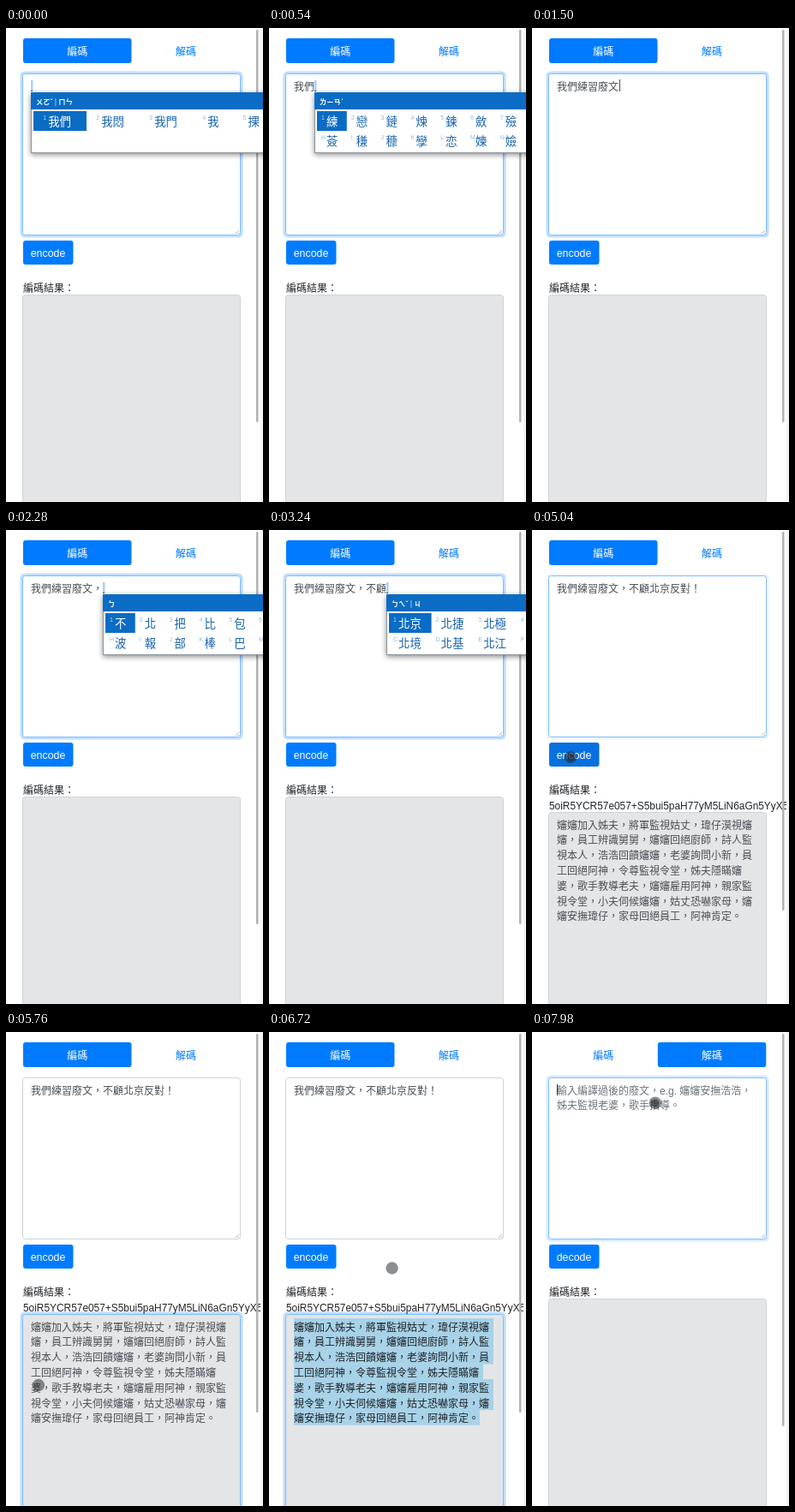
Animation, 300 px wide and 553 px high, one loop 8 s. Source, as an HTML page:

```html
<!DOCTYPE html>
<html lang="zh-Hant">
<head>
<meta charset="utf-8">
<style>
html, body { margin: 0; width: 100%; height: 100%; overflow: hidden; background: #fff; }
svg { display: block; width: 300px; height: 553px; font: 12px "Liberation Sans", "Noto Sans CJK TC", "Noto Sans CJK", sans-serif; }
text { white-space: pre; }
.popup { filter: drop-shadow(0 2px 3px rgba(0, 0, 0, .45)); }
</style>
</head>
<body>
<svg id="stage" viewBox="0 0 300 553"></svg>
<script>
const LOOP = 8000, STEP = 60;
const BLUE = '#007bff', PRESSED_BLUE = '#0870e0', INK = '#495057', DARK = '#212529';
const MESSAGE = '我們練習廢文，不顧北京反對！';
const BASE64 = '5oiR5YCR57e057+S5bui5paH77yM5LiN6aGn5YyX5Lqs';
const RESULT = [
  '嬸嬸加入姊夫，將軍監視姑丈，瑋仔漠視嬸', '嬸，員工辨識舅舅，嬸嬸回絕廚師，詩人監',
  '視本人，浩浩回饋嬸嬸，老婆詢問小新，員', '工回絕阿神，令尊監視令堂，姊夫隱瞞嬸',
  '婆，歌手教導老夫，嬸嬸雇用阿神，親家監', '視令堂，小夫伺候嬸嬸，姑丈恐嚇家母，嬸',
  '嬸安撫瑋仔，家母回絕員工，阿神肯定。'
];
const HINT = ['輸入編譯過後的廢文，e.g. 嬸嬸安撫浩浩，', '姊夫監視老婆，歌手指導。'];

// Typing: time, committed characters, phonetic keys, candidate rows (kept from the previous entry if absent)
const TYPING = [
  [0, 0, 'ㄨㄛˇ|ㄇㄣ', '我們 我悶 我門 我 捰', ''],
  [120, 0, 'ㄨㄛˇ|ㄇㄣ˙'],
  [180, 2],
  [360, 2, 'ㄌ', '了 來 裡 老 兩 六 樓', '路 力 拉 連 林 李 龍'],
  [420, 2, 'ㄌㄧ', '裡 力 利 李 離 立 理', '里 禮 例 麗 歷 哩 厲'],
  [480, 2, 'ㄌㄧㄢ', '連 臉 練 聯 戀 蓮 憐', '鏈 廉 煉 簾 鐮 斂 漣'],
  [540, 2, 'ㄌㄧㄢˋ', '練 戀 鏈 煉 鍊 斂 殮', '薟 稴 穅 孿 恋 媡 嬐'],
  [660, 2, 'ㄌㄧㄢˋ|ㄒ', '練習 戀想 練下 練些 練心', '練線 練寫 練新 戀惜 練學'],
  [780, 2, 'ㄌㄧㄢˋ|ㄒㄧ', '練習 練洗 練西 練系 練喜', '戀惜 練戲 練席 練息 練細'],
  [840, 2, 'ㄌㄧㄢˋ|ㄒㄧˊ', '練習 戀習 練席 練息 戀惜', '鍊習 煉習 練襲 鏈席 練熄'],
  [960, 2, 'ㄌㄧㄢˋ|ㄒㄧˊ|ㄈ', '練習法 練習分 練習 練', '練習方 練習房 戀惜 戀'],
  [1020, 2, 'ㄌㄧㄢˋ|ㄒㄧˊ|ㄈㄟ', '練習飛 練習非 練習 練', '練習費 練習肥 戀惜 戀'],
  [1140, 2, 'ㄌㄧㄢˋ|ㄒㄧˊ|ㄈㄟˋ', '練習費 練習廢 練習 練', '練習肺 練習沸 戀惜 戀'],
  [1200, 2, 'ㄌㄧㄢˋ|ㄒㄧˊ|ㄈㄟˋ|ㄨ', '練習廢物 練習費 練習 練', '練習廢 練習肺 戀惜 戀'],
  [1260, 2, 'ㄌㄧㄢˋ|ㄒㄧˊ|ㄈㄟˋ|ㄨㄣ', '練習廢文 練習費 練習 練', '練習廢 練習肺 戀惜 戀'],
  [1320, 2, 'ㄌㄧㄢˋ|ㄒㄧˊ|ㄈㄟˋ|ㄨㄣˊ'],
  [1500, 6],
  [1860, 7],
  [2040, 7, 'ㄅ', '不 北 把 比 包 吧', '波 報 部 棒 巴 百'],
  [2340, 7, 'ㄅㄨ', '不 部 步 布 補 捕', '怖 埠 簿 卜 哺 佈'],
  [2400, 7, 'ㄅㄨˋ', '不 部 步 布 怖 佈', '埠 簿 鈽 篰 钚 廍'],
  [2460, 7, 'ㄅㄨˋ|ㄍ', '不過 不夠 不敢 不該', '不管 不顧 不光 布告'],
  [2520, 7, 'ㄅㄨˋ|ㄍㄨ', '不顧 不過 不管 不光', '布穀 不估 不軌 不歸'],
  [2640, 7, 'ㄅㄨˋ|ㄍㄨˋ', '不顧 不固 不故 不雇', '部顧 步故 布固 佈雇'],
  [2820, 9],
  [3000, 9, 'ㄅ', '不 北 把 比 包 吧', '波 報 部 棒 巴 百'],
  [3060, 9, 'ㄅㄟ', '被 北 背 杯 倍 備', '輩 貝 悲 卑 碑 臂'],
  [3120, 9, 'ㄅㄟˇ', '北 鉳 俻 苝 琲 㔨', '被 倍 輩 貝 悖 狽'],
  [3180, 9, 'ㄅㄟˇ|ㄐ', '北京 北捷 北極 北郊', '北境 北基 北江 北九'],
  [3300, 9, 'ㄅㄟˇ|ㄐㄧ', '北極 北基 北京 北捷', '北雞 北濟 北江 北郊'],
  [3360, 9, 'ㄅㄟˇ|ㄐㄧㄥ', '北京 北境 北靜 北景', '北經 北晶 北井 北鏡'],
  [3480, 9, 'ㄅㄟˇ|ㄐㄧㄥ|ㄈ', '北京方 北京飯 北京', '北京分 北京法 北境'],
  [3540, 9, 'ㄅㄟˇ|ㄐㄧㄥ|ㄈㄢ', '北京飯 北京反 北京', '北京範 北京返 北境'],
  [3600, 9, 'ㄅㄟˇ|ㄐㄧㄥ|ㄈㄢˇ', '北京反 北京返 北京', '北境反 北境返 北境'],
  [3660, 9, 'ㄅㄟˇ|ㄐㄧㄥ|ㄈㄢˇ|ㄉ', '北京反對 北京反 北京', '北京反動 北京返 北境'],
  [3720, 9, 'ㄅㄟˇ|ㄐㄧㄥ|ㄈㄢˇ|ㄉㄨ'],
  [3780, 9, 'ㄅㄟˇ|ㄐㄧㄥ|ㄈㄢˇ|ㄉㄨㄟ'],
  [3840, 9, 'ㄅㄟˇ|ㄐㄧㄥ|ㄈㄢˇ|ㄉㄨㄟˋ'],
  [3960, 13],
  [4380, 14]
];
TYPING.forEach((e, i) => {
  if (e[2] && e[3] === undefined) [e[3], e[4]] = TYPING[i - 1].slice(3);
});

// Pointer path: time, x, y
const PATH = [[4500, 17, 300], [4860, 45, 265], [5340, 45, 265], [5640, 38, 412], [6480, 38, 412],
  [6720, 143.6, 275.5], [6900, 143.6, 275.5], [7200, 210, 27], [7380, 210, 27], [7740, 143.8, 82.7], [LOOP, 143.8, 82.7]];
const PRESSES = [[4920, 5160], [5640, 5760], [7260, 7380], [7800, LOOP]];

const clamp = v => Math.max(0, Math.min(1, v));
const within = (t, a, b) => t >= a && t < b;
const rect = (x, y, w, h, fill, extra = '') =>
  `<rect x="${x}" y="${y}" width="${w}" height="${h}" fill="${fill}" ${extra}/>`;
// y is the middle of the line
const text = (s, x, y, fill, size = 12, extra = '') =>
  `<text x="${x}" y="${y + size * .39}" fill="${fill}" font-size="${size}" ${extra}>${s}</text>`;
const centred = (s, x, y, fill, size = 12) => text(s, x, y, fill, size, 'text-anchor="middle"');

function field(y, h, fill, focus) {
  const ring = `stroke="${BLUE}" stroke-width="3" stroke-opacity="${.25 * focus}"`;
  const line = `stroke="${focus > .1 ? '#80bdff' : '#ced4da'}"`;
  return rect(18, y - 1.5, 257, h + 3, 'none', `rx="4" ${ring}`) +
    rect(19.5, y, 254, h, fill, `rx="3" ${line}`);
}

function tab(label, x, active) {
  return (active ? rect(x, 12, 126.5, 29, BLUE, 'rx="3"') : '') +
    centred(label, x + 63.3, 27, active ? '#fff' : BLUE);
}

function candidates(row, x, y, labels, extra) {
  let left = x + 3;
  return row.split(' ').map((word, i) => {
    const w = 20 + 14.8 * word.length + extra, first = i === 0 && labels[0] === '1';
    const out = (first ? rect(left, y - 11.5, w, 23, '#0a6cc4') : '') +
      text(labels[i], left + 5 + extra / 2, y - 4, first ? '#b5d8f5' : '#8dbbe4', 7) +
      text(word, left + 11 + extra / 2, y, first ? '#fff' : '#1763ad', 13.4);
    left += w;
    return out;
  }).join('');
}

function popup([, count, keys, top, bottom]) {
  const x = 29 + 12 * count;
  const title = keys.replaceAll('|', '<tspan fill-opacity=".55"> | </tspan>');
  const lower = top.split(' ')[0].length > 1 ? 'CDEFGHI' : 'HIJKLMN';
  return `<g class="popup">${rect(x + .5, 75.5, 330, 70, '#fff', 'stroke="#8b949c"')}</g>` +
    rect(x, 75, 330, 20, '#0a6cc4') +
    text(title, x + 6, 85.5, '#fff', 8.3, 'font-weight="bold"') +
    candidates(top, x, 108.5, '1234567', bottom ? 0 : 12.4) +
    (bottom ? candidates(bottom, x, 131.5, lower, 0) : '');
}

function pointer(t) {
  if (t < 4560) return '';
  const i = PATH.findIndex(p => p[0] > t), [a, b] = [PATH[i - 1], PATH[i]];
  const k = (t - a[0]) / (b[0] - a[0]), s = k * k * (3 - 2 * k);
  const at = `cx="${a[1] + (b[1] - a[1]) * s}" cy="${a[2] + (b[2] - a[2]) * s}" fill="#23282d"`;
  const pressed = PRESSES.some(p => within(t, ...p));
  return `<circle ${at} r="7.2" fill-opacity=".52"/>` +
    (pressed ? `<circle ${at} r="4.5" fill-opacity=".5"/>` : '');
}

function scene(t) {
  const state = TYPING.findLast(e => e[0] <= t);
  const decoding = t >= 7320, encoded = t >= 4980 && !decoding;
  const typing = t < 4980, selected = within(t, 6120, 7320);
  const focus = decoding ? clamp((t - 7920) / 100) : 1 - clamp((t - 4960) / 110);
  const buttonDown = within(t, 4980, 5160);
  const buttonRing = clamp((t - 5100) / 150) * clamp((5700 - t) / 150);
  const resultFocus = decoding ? 0 : clamp((t - 5640) / 120);
  const boxTop = encoded ? 329.5 : 311.5;

  let out = rect(0, 0, 300, 553, '#fff') +
    tab('編碼', 20, !decoding) + tab('解碼', 146.8, decoding) +
    field(53.5, 188, '#fff', focus) +
    '<path d="M268 240l4-4M271 240l1-1" stroke="#999" stroke-width=".7"/>';

  if (decoding) out += HINT.map((s, i) => text(s, 29, 68 + i * 17.6, '#6c757d')).join('');
  else out += text(MESSAGE.slice(0, state[1]), 29, 68, INK);

  const caretX = 29 + 12 * state[1];
  if (typing && state[2]) out += rect(caretX, 61, 2.5, 13, '#a9d0f5') + rect(caretX, 73, 2, 1, INK);
  else if (typing && !within(t, 4200, 4380)) out += rect(caretX + 1, 60, 1, 14, INK);
  if (t >= 7980) out += rect(29, 61, 1, 13, DARK);

  out += rect(18.5, 246.5, 61, 31, 'none', `rx="4" stroke="${BLUE}" stroke-width="3" stroke-opacity="${.45 * buttonRing}"`) +
    rect(20, 248, 58.5, 28, buttonDown ? PRESSED_BLUE : BLUE, 'rx="3"') +
    centred(decoding ? 'decode' : 'encode', 49, 262, '#fff', 12.4) +
    text('編碼結果：', 20, 303, DARK) +
    field(boxTop, 260, '#e4e5e7', resultFocus);

  if (encoded) {
    out += text(BASE64, 20, 321, DARK, 11.9);
    RESULT.forEach((line, i) => {
      const y = 344 + i * 17.8;
      const tail = i < RESULT.length - 1 ? 5 : 1;
      if (selected) out += rect(29, y - 10, line.length * 12 + tail, 18, '#a7d2e8');
      out += text(line, 29, y, selected ? DARK : INK);
    });
  }

  out += rect(297, 0, 3, 553, '#f3f3f3') +
    rect(292, 2, 2.5, encoded ? 442 : 458, '#b3b3b3', 'rx="1.2"');
  if (state[2]) out += popup(state);
  return out + pointer(t);
}

const stage = document.getElementById('stage');
const start = performance.now();
let shown = -1;
function frame() {
  const t = Math.floor((performance.now() - start) % LOOP / STEP) * STEP;
  if (t !== shown) stage.innerHTML = scene(shown = t);
  requestAnimationFrame(frame);
}
frame();
</script>
</body>
</html>
```
